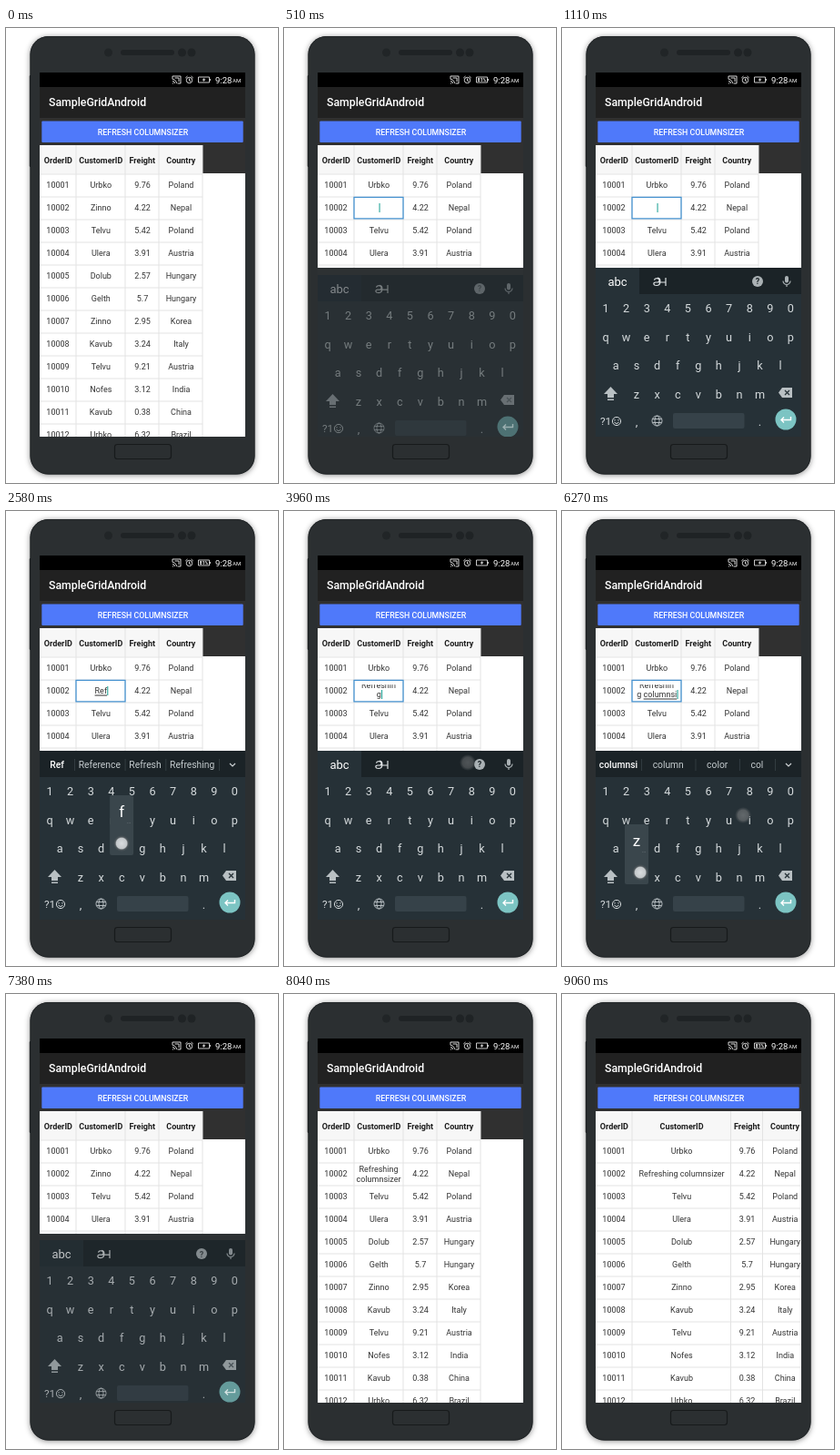
Write an HTML page with a canvas that moves like this. It is 299 by 501 pixels and loops after 9300 ms.

```html
<!DOCTYPE html>
<html>
<head>
<meta charset="utf-8">
<style>
html, body { margin: 0; width: 299px; height: 501px; overflow: hidden; background: #fff; }
canvas { display: block; }
</style>
</head>
<body>
<canvas width="299" height="501"></canvas>
<script>
const c = document.querySelector('canvas').getContext('2d');
const LOOP = 9300, EDIT = 100, ENTER = 6930, COMMIT = 7200, CLOSE = 7340, RESIZE = 8580, PRESS = 8350;
const ENTRY = 'Refreshing columnsizer';
const customers = 'Urbko Zinno Telvu Ulera Dolub Gelth Zinno Kavub Telvu Nofes Kavub Urbko'.split(' ');
const freights = '9.76 4.22 5.42 3.91 2.57 5.7 2.95 3.24 9.21 3.12 0.38 6.32'.split(' ');
const countries = 'Poland Nepal Poland Austria Hungary Hungary Korea Italy Austria India China Brazil'.split(' ');

const keyRows = [['1234567890', 48, 308], ['qwertyuiop', 48, 340], ['asdfghjkl', 59.3, 371], ['zxcvbnm', 82, 403]];
const keys = {};
for (const [letters, x, y] of keyRows)
  [...letters].forEach((k, i) => keys[k] = [x + i * 22.6, y]);

const letterTaps = [[1700, 'r'], [2050, 'e'], [2500, 'f'], [4350, 'c'], [4640, 'o'], [4920, 'l'], [5090, 'u'],
  [5390, 'm'], [5650, 'n'], [5880, 's'], [6070, 'i'], [6270, 'z'], [6450, 'e'], [6630, 'r']];
const PICK = 3750;
// The finger lands a little short of the far keys
const landing = ([x, y]) => [x - (x - 127) * .09, y - 5];
const taps = [[30, 104, 198], [1300, 53, 403], [PICK, 202, 277], [ENTER, 246, 431], [PRESS, 150, 115],
  ...letterTaps.map(([t, k]) => [t, ...landing(keys[k])])];

const suggestions = {
  R: 'Are Read Really', Re: 'Red Read Really', Ref: 'Reference Refresh Refreshing',
  c: 'can could coming', co: 'come could cooking', col: 'color college collection'
};

function text(s, x, y, size, color = '#fff', weight = 400, align = 'center') {
  c.font = `${weight} ${size}px Roboto, sans-serif`;
  c.fillStyle = color;
  c.textAlign = align;
  c.fillText(s, x, y + size * .36);
}
function box(x, y, w, h, fill, r = 0) {
  c.fillStyle = fill;
  c.beginPath();
  c.roundRect(x, y, w, h, r);
  c.fill();
}
function disc(x, y, r, fill) {
  c.fillStyle = fill;
  c.beginPath();
  c.arc(x, y, r, 0, 7);
  c.fill();
}
function line(d, x, y, color = '#cfd4d6', width = 1) {
  c.save();
  c.translate(x, y);
  c.strokeStyle = color;
  c.lineWidth = width;
  c.stroke(new Path2D(d));
  c.restore();
}
function shape(d, x, y, fill = '#b9c0c3') {
  c.save();
  c.translate(x, y);
  c.fillStyle = fill;
  c.fill(new Path2D(d));
  c.restore();
}

function phone() {
  box(25.8, 52, 3, 101, '#1d2123', 1);
  c.save();
  c.shadowColor = 'rgba(0,0,0,.45)';
  c.shadowBlur = 6;
  c.shadowOffsetY = 1;
  box(26.5, 9, 247, 482.5, '#2b2f31', 20);
  c.restore();
  c.strokeStyle = '#222628';
  c.lineWidth = 1;
  c.beginPath();
  c.roundRect(27, 9.5, 246, 481.5, 19.5);
  c.stroke();
  disc(112.5, 27, 4.5, '#212527');
  box(126, 24, 59, 6, '#1f2325', 3);
  disc(193.5, 27, 4.5, '#1f2325');
  disc(204, 27, 4.5, '#1f2325');
  line('M3 0H59Q62 0 62 3V13Q62 16 59 16H3Q0 16 0 13V3Q0 0 3 0Z', 119.5, 458.5, '#171a1b', 1.2);
}

function statusBar(t) {
  box(37, 49, 226, 16, '#000');
  const charged = [[350, 750], [1500, 3300], [4300, 6250], [6800, 7200], [8700, LOOP]].some(([a, b]) => t >= a && t < b);
  line('M-4.5 -1V-4H4.5V4H1M-4.5 4H-3.5M-4.5 1.5A2.5 2.5 0 0 1 -2 4M-4.5 -.6A4.6 4.6 0 0 1 0 4M-2 -2H2.5V2', 187.5, 57, '#eee', .9);
  line('M3.2 .5A3.2 3.2 0 1 1 -3.2 .5A3.2 3.2 0 1 1 3.2 .5M0 -1.5V1L1.5 2M-4.2 -2L-2 -4M4.2 -2L2 -4', 201.5, 57, '#eee', .9);
  line('M0 0H12V6H0ZM13 2V4', 211.5, 54, '#ddd', .9);
  if (charged) text('81%', 217.5, 57, 5, '#fff', 700);
  else shape('M1 -2.5L-2 .5H0L-1 2.5L2 -.5H0Z', 217.5, 57, '#fff');
  text('9:28', 230, 57.3, 9.5, '#fff', 400, 'left');
  text('AM', 249, 58, 6, '#fff', 400, 'left');
}

function button(t) {
  box(39.3, 102.5, 221.4, 23.5, '#4f79fa', 1);
  const age = t - PRESS;
  if (age > 0 && age < 400) {
    c.save();
    c.beginPath();
    c.rect(40, 103, 220, 23);
    c.clip();
    disc(150, 115, 10 + age * .4, `rgba(255,255,255,${.25 * Math.min(1, (400 - age) / 200)})`);
    c.restore();
  }
  text('REFRESH COLUMNSIZER', 150.5, 114.7, 8.8, '#fff', 500);
}

function grid(t) {
  const edges = t < RESIZE ? [37, 77, 131, 168, 216] : [37, 77, 185.5, 220.5, 269];
  const mid = i => (edges[i] + edges[i + 1]) / 2;
  box(37, 160, 226, 290, '#fff');
  box(37, 129, edges[4] - 37, 31.5, '#f7f7f7');
  ['OrderID', 'CustomerID', 'Freight', 'Country'].forEach((s, i) => text(s, mid(i) + .3, 145.5, 9, '#1c1c1c', 700));
  customers.forEach((name, r) => {
    const y = 173 + r * 25;
    const edited = r == 1 && t >= 7470;
    text(10001 + r, mid(0), y - .5, 9, '#333');
    if (edited && t < RESIZE) ENTRY.split(' ').forEach((s, i) => text(s, mid(1), y - 5 + i * 10.5, 9, '#333'));
    else text(edited ? ENTRY : name, mid(1) + .3, y, 9, '#333');
    text(freights[r], mid(2) + .5, y, 9, '#333');
    text(countries[r], mid(3) + .5, y, 9, '#333');
    box(37, y - 12.5, edges[4] - 37, 1, '#e3e3e3');
  });
  edges.slice(1).forEach(x => box(x - .5, 129, 1, 322, '#e3e3e3'));
}

// State of the text being typed at time t
function typing(t) {
  let word = '', last = EDIT;
  for (const [at, k] of letterTaps) {
    if (t < at + 60 || (t >= PICK + 60 && at < PICK)) continue;
    word += at < 2000 ? 'R' : k;
    last = at + 60;
  }
  const picked = t >= PICK + 60;
  if (picked && !word) last = PICK + 60;
  return { word, picked, last };
}

function editor(t, { word, picked, last }) {
  if (t < EDIT || t >= COMMIT) return;
  box(77, 186, 54, 24, '#fff');
  c.save();
  c.beginPath();
  c.rect(79, 191.3, 50, 17);
  c.clip();
  c.font = '9px Roboto, sans-serif';
  let above = '', lead = '';
  if (picked) {
    above = 'Refreshin';
    lead = word ? 'g ' : 'g';
    if (c.measureText(lead + word).width > 44) [above, lead] = ['g', ''];
  }
  const y = picked ? 202 : 198;
  const width = c.measureText(lead + word).width;
  const left = 104.3 - width / 2;
  text(above, 104, 191.3, 9, '#333');
  text(lead + word, left, y, 9, '#333', 400, 'left');
  const start = left + c.measureText(lead).width;
  if (word) box(start, y + 4.5, left + width - start, .9, '#333');
  if (Math.floor((t - last) / 500) % 2 == 0) box(left + width + .2, y - 5, 1.1, 10, '#26a69a');
  c.restore();
  line('M0 0H54V23.5H0Z', 77, 186.3, '#4491cf', 1.3);
}

function strip(word) {
  box(37, 264, 226, 29, '#1b2327');
  if (word) {
    const options = [word, ...(suggestions[word] || 'column color col').split(' ')];
    c.font = '10.3px Roboto, sans-serif';
    const widths = options.map(s => c.measureText(s).width);
    const first = Math.max(38, widths[0] + 8);
    const pad = (197 - first - widths[1] - widths[2] - widths[3]) / 3;
    let x = 37;
    options.forEach((s, i) => {
      const cell = i ? widths[i] + pad : first;
      text(s, x + cell / 2, 279, 10.3, i ? '#c4cbce' : '#fff', i ? 400 : 500);
      x += cell;
      box(x, 273, 1, 13, '#323c41');
    });
    line('M-3 -1.5L0 1.5L3 -1.5', 249, 279.5, '#cfd4d6', 1.2);
    return;
  }
  box(37, 264, 48, 29, '#263137');
  text('abc', 61, 279, 13);
  line('M-6.5 -1.5A2.8 2.3 0 1 1 -2.5 1H-5C-8 1 -8 4.5 -4 4.5C1 4.5 1 -3.5 -3 -3.8M-2.5 1H6M6 -4V5', 108, 279, '#dfe3e5', 1.2);
  disc(215, 279, 6, '#aab1b4');
  text('?', 215, 279.2, 9, '#1b2327', 700);
  box(245, 273, 4, 7.5, '#aab1b4', 2);
  line('M-4 0A4 4 0 0 0 4 0M0 4V6.5', 247, 278.5, '#aab1b4', 1.2);
}

function keyboard(t, { word }) {
  box(37, 264, 226, 187, '#263137');
  strip(t < ENTER + 60 && word);
  const caps = t >= 1360 && t < 1760;
  for (const k in keys) text(caps ? k.toUpperCase() : k, ...keys[k], 12.7, '#d5dadc');
  shape('M0 -7.5L7.5 .5H3.5V4.5H-3.5V.5H-7.5ZM-3.5 6H3.5V7.5H-3.5Z', 53.5, 402.5, caps ? '#80cbc4' : '#b9c0c3');
  shape('M-8 0L-4 -5.5H7V5.5H-4Z', 246, 401.5);
  line('M-2 -2.5L3 2.5M3 -2.5L-2 2.5', 247, 401.5, '#263137', 1.3);
  text('?1', 48, 433, 11.8, '#d5dadc');
  line('M4.6 0A4.6 4.6 0 1 1 -4.6 0A4.6 4.6 0 1 1 4.6 0M-2.5 1.2Q0 4 2.5 1.2M-2 -2V-.6M2 -2V-.6', 60, 433, '#d5dadc');
  text(',', 82, 433, 13, '#d5dadc');
  line('M5.5 0A5.5 5.5 0 1 1 -5.5 0A5.5 5.5 0 1 1 5.5 0M2.5 0A2.5 5.5 0 1 1 -2.5 0A2.5 5.5 0 1 1 2.5 0M-5 -2H5M-5 2H5', 104.5, 432.5, '#c3cacd', .9);
  box(122, 424, 78.5, 17, '#364249', 2);
  text('.', 217.5, 433, 13, '#d5dadc');
  disc(246, 431, 11.5, '#7cc4c3');
  line('M5.5 -3.5V0H-5M-2 -3L-5 0L-2 3', 246, 431.5, '#fff', 1.4);
  for (const [at, k] of letterTaps) {
    if (t < at || t >= at + 140) continue;
    const [x, y] = keys[k];
    box(x - 13, y - 58, 26, 66, '#3a464c', 2);
    text(caps ? k.toUpperCase() : k, x, y - 40, 17);
    text('…', x + 8, y - 29, 6, '#8b9498');
  }
}

function touches(t) {
  for (const [at, x, y] of taps) {
    const age = t - at;
    if (age < 0 || age > 320) continue;
    const power = Math.min(1, (320 - age) / 200) ** 2;
    const tone = 60 + 150 * power, alpha = Math.min(1, power * 2);
    const glow = c.createRadialGradient(x, y, 0, x, y, 9);
    glow.addColorStop(0, `rgba(${tone + 15},${tone + 18},${tone + 20},${.95 * alpha})`);
    glow.addColorStop(.65, `rgba(${tone},${tone + 3},${tone + 5},${.9 * alpha})`);
    glow.addColorStop(.8, `rgba(90,95,98,${.6 * alpha})`);
    glow.addColorStop(1, 'rgba(90,95,98,0)');
    disc(x, y, 9, glow);
  }
}

function draw(t) {
  const state = typing(t);
  c.fillStyle = '#fff';
  c.fillRect(0, 0, 299, 501);
  phone();
  c.save();
  c.beginPath();
  c.rect(37, 49, 226, 401);
  c.clip();
  box(37, 65, 226, 386, '#303030');
  box(37, 65, 226, 34, '#212121');
  statusBar(t);
  text('SampleGridAndroid', 47, 82, 12.3, '#fff', 500, 'left');
  button(t);
  grid(t);
  editor(t, state);
  const opening = Math.min(1, (t - 400) / 250), closing = Math.max(0, (t - CLOSE) / 150);
  if (opening > 0 && closing < .87) {
    box(37, 264, 226, 187, '#2d3133');
    c.save();
    c.globalAlpha = opening * (1 - closing);
    c.translate(0, 26 * ((1 - opening) ** 2 + closing));
    keyboard(t, state);
    c.restore();
  }
  touches(t);
  c.restore();
}

const begin = performance.now();
function tick() {
  draw((performance.now() - begin) % LOOP);
  requestAnimationFrame(tick);
}
tick();
</script>
</body>
</html>
```
